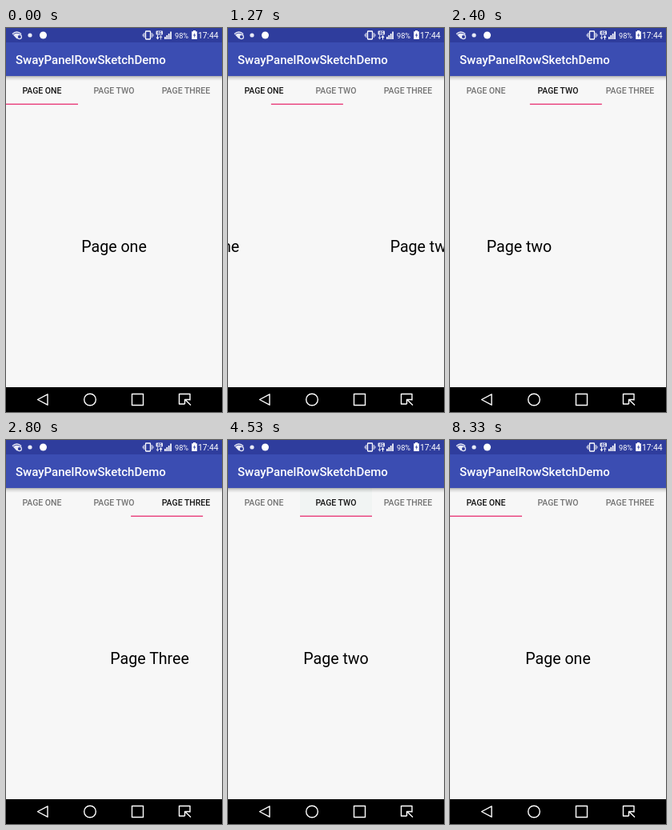
Write an HTML page that moves like this. It is 270 by 480 pixels and loops after 8.39 s.

```html
<!DOCTYPE html>
<html lang="en">
<head>
<meta charset="utf-8">
<title>Swipe tabs</title>
<style>
  html, body { margin: 0; width: 100%; height: 100%; overflow: hidden; background: #f7f7f7; }
  svg { display: block; width: 100vw; height: 100vh; font-family: Roboto, sans-serif; }
  .tab { font-size: 10.5px; font-weight: 500; text-anchor: middle; }
  .page { font-size: 19.6px; text-anchor: middle; fill: #000; }
  .line { fill: none; stroke: #fff; stroke-width: 1.4; stroke-linejoin: round; }
</style>
</head>
<body>
<svg viewBox="0 0 270 480" preserveAspectRatio="none">
  <defs>
    <linearGradient id="shade" x1="0" y1="0" x2="0" y2="1">
      <stop offset="0" stop-color="#000" stop-opacity=".3"/>
      <stop offset=".35" stop-color="#000" stop-opacity=".13"/>
      <stop offset="1" stop-color="#000" stop-opacity="0"/>
    </linearGradient>
  </defs>
  <rect width="270" height="480" fill="#f7f7f7"/>
  <g id="pages"></g>
  <rect id="press" y="60" width="90" height="36" fill="#f1f4f3"/>
  <g id="tabs"></g>
  <rect id="bar" y="94.5" width="90" height="1.5" fill="#ea4881"/>
  <rect y="60" width="270" height="6" fill="url(#shade)"/>

  <rect y="18" width="270" height="42" fill="#3b4db2"/>
  <rect width="270" height="18" fill="#2f3d9d"/>
  <text x="12" y="45" font-size="15" font-weight="500" fill="#fff">SwayPanelRowSketchDemo</text>

  <!-- status icons -->
  <path d="M7.500 7Q13.500 1.500 19.500 7L13.500 13.500Z" fill="#e8eaf6"/>
  <path d="M9 8Q13.500 4.500 18 8" fill="none" stroke="#2f3d9d" stroke-width=".9"/>
  <circle cx="16.800" cy="11" r="2.600" fill="#2f3d9d" stroke="#e8eaf6" stroke-width="1.200"/>
  <circle cx="30" cy="9" r="2.600" fill="#e8eaf6"/>
  <circle cx="46.500" cy="9" r="4.500" fill="#fff"/>
  <g fill="none" stroke="#fff">
    <rect x="174.500" y="4" width="6" height="10" rx=".8" stroke-width="1.300"/>
    <path d="M172.800 6v6M171.200 7.500v3M182.300 6v6M184 7.500v3" stroke-width=".9"/>
  </g>
  <rect x="187.500" y="3.500" width="8.500" height="5" rx="1" fill="#e8eaf6"/>
  <text x="191.750" y="7.800" font-size="4.500" font-weight="700" text-anchor="middle" fill="#2f3d9d">4G</text>
  <path id="down" d="M190 9v2.500h1.500L189.500 14.500L187.500 11.500H189V9z" fill="#fff"/>
  <path id="up" d="M194 14.500V12h1.500L193.500 9L191.500 12H193v2.500z" fill="#fff"/>
  <path d="M198 11h1.700v3H198zM200.400 9h1.700v5h-1.700zM202.800 7h1.700v7h-1.700zM205.200 4.500h1.700v9.500h-1.700z" fill="#fff"/>
  <text x="211" y="12.500" font-size="9.200" fill="#fff">98%</text>
  <path d="M234 3h3v1.200h1.800V14h-6.600V4.200H234z" fill="#fff"/>
  <path d="M236 6l-2 3.500h1.500L235 12.500l2.200-4h-1.500z" fill="#2f3d9d"/>
  <text x="240" y="12.700" font-size="10.300" fill="#fff">17:44</text>

  <!-- navigation bar -->
  <rect y="449" width="270" height="31" fill="#000"/>
  <path class="line" d="M39.500 464.500L52 457.800V471.200Z"/>
  <circle class="line" cx="105" cy="464.500" r="7.300"/>
  <rect class="line" x="157.500" y="457.500" width="14" height="14"/>
  <path class="line" d="M223.500 470H216.500V457.500H230V465.500M223.500 470V464.500H230M224 464.800L231 471.500"/>
</svg>
<script>
const LOOP = 8390, STEP = 1000 / 15;
const names = ["one", "two", "Three"];
const $ = id => document.getElementById(id);
const clamp = x => Math.min(1, Math.max(0, x));
const quint = u => 1 - (1 - u) ** 5;

// Finger drags to the given share of a page, then the pager settles in 600 ms.
const swipes = [
  { start: 770, release: 1300, share: .65, lag: 0 },
  { start: 2230, release: 2748, share: .74, lag: 55 }
];
const taps = [{ start: 4229, tab: 1 }, { start: 5690, tab: 0 }];

function addText(parent, cls, x, y, label) {
  const el = document.createElementNS("http://www.w3.org/2000/svg", "text");
  el.setAttribute("class", cls);
  el.setAttribute("x", x);
  el.setAttribute("y", y);
  el.textContent = label;
  return parent.appendChild(el);
}

const tabs = names.map((n, i) => {
  addText($("pages"), "page", 135 + 270 * i, 280, "Page " + n);
  return addText($("tabs"), "tab", 45 + 90 * i, 82, "PAGE " + n.toUpperCase());
});

// cubic-bezier(.4, 0, .2, 1)
function standard(x) {
  let lo = 0, hi = 1, s = .5;
  for (let i = 0; i < 18; i++) {
    s = (lo + hi) / 2;
    const bx = 1.2 * s * (1 - s) ** 2 + .6 * s * s * (1 - s) + s ** 3;
    if (bx < x) lo = s; else hi = s;
  }
  return s * s * (3 - 2 * s);
}

function swipe(t, m) {
  if (t < m.release) return m.share * clamp((t - m.start) / (m.release - m.start)) ** 1.27;
  return m.share + (1 - m.share) * quint(clamp((t - m.release) / 600));
}

function position(t, tapTime, tapEase, lagged) {
  let p = 0;
  for (const m of swipes) p += swipe(t - (lagged ? m.lag : 0), m);
  for (const m of taps) p -= tapEase(clamp((t - m.start) / tapTime));
  return p;
}

function selected(t) {
  let tab = swipes.filter(m => t >= m.release).length;
  for (const m of taps) if (t >= m.start) tab = m.tab;
  return tab;
}

function draw(time) {
  const t = Math.floor((time % LOOP + 4) / STEP) * STEP;
  $("pages").setAttribute("transform", `translate(${-270 * position(t, 200, quint, false)} 0)`);
  $("bar").setAttribute("x", 90 * position(t, 300, standard, true));

  const active = selected(t);
  tabs.forEach((el, i) => el.setAttribute("fill", i === active ? "#141414" : "#747474"));

  const pressed = t >= 4229 && t < 8330;
  $("press").setAttribute("visibility", pressed ? "visible" : "hidden");
  $("press").setAttribute("x", t < 5660 ? 90 : 0);

  const busy = t < 266 || t >= 8330 || (t >= 3130 && t < 4260) || (t >= 5260 && t < 5400);
  $("down").setAttribute("opacity", busy ? 1 : .75);
  $("up").setAttribute("opacity", busy ? .75 : 1);
}

const begin = performance.now();
function tick() {
  draw(performance.now() - begin);
  requestAnimationFrame(tick);
}
tick();
</script>
</body>
</html>
```
